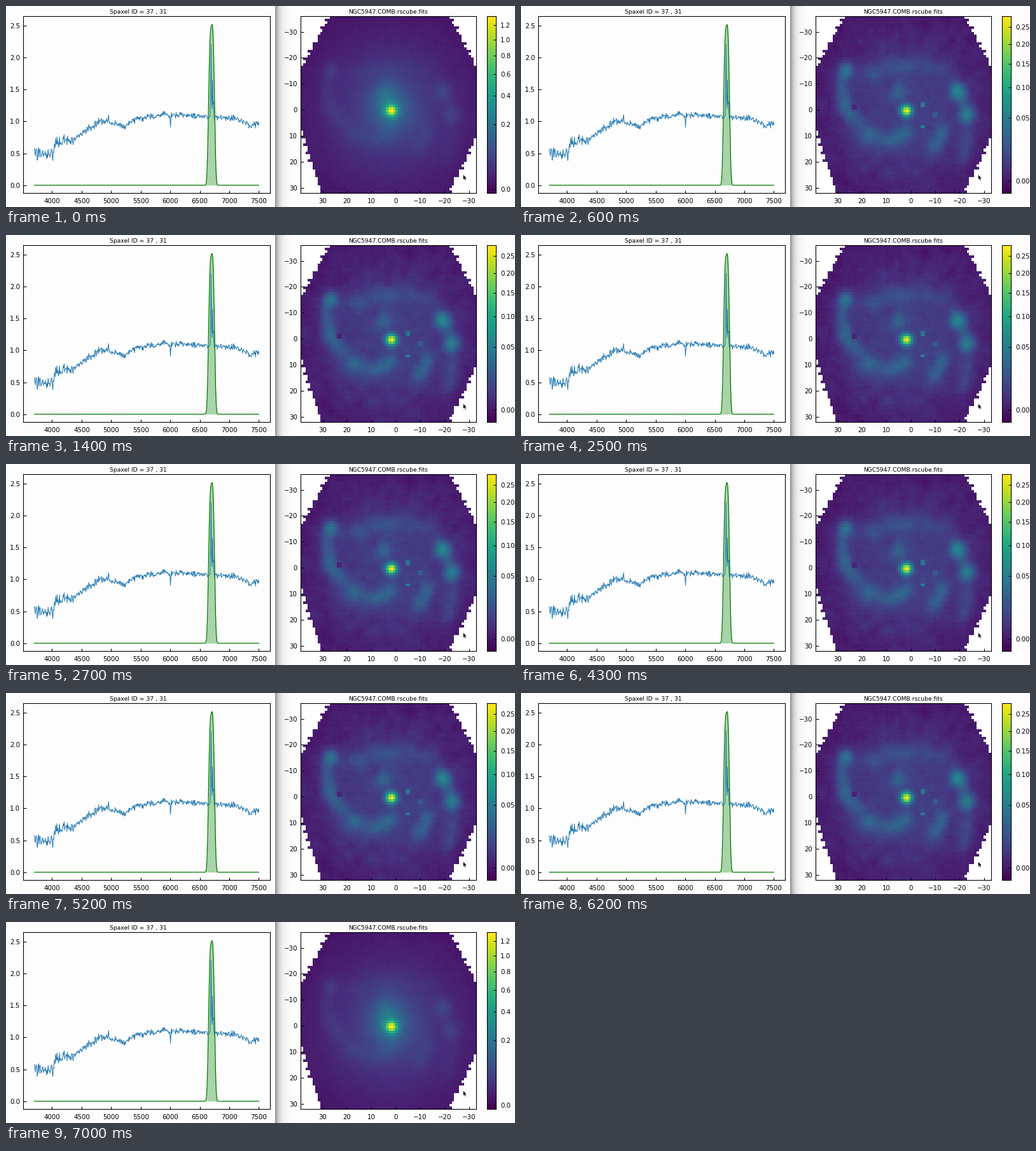
Recreate the animation shown at these times as a matplotlib script. Size 800 by 316 pixels, loop 7.1 s.

```python
import numpy as np
import matplotlib.pyplot as plt
from matplotlib.animation import FuncAnimation
from matplotlib.patches import Polygon

W, H, DPI = 800, 316, 100
STEP, FRAMES = 100, 71
SWITCHES = (400, 2800, 4200, 6300)  # ms
BG = "#fdfdfd"
PX = 72 / DPI  # points per pixel

plt.rcParams.update({"font.family": "DejaVu Sans", "font.size": 10.2 * PX,
                     "axes.linewidth": 1.1 * PX})
for k in ("xtick", "ytick"):
    plt.rcParams.update({f"{k}.direction": "in", f"{k}.major.size": 4.5 * PX,
                         f"{k}.major.width": 1.1 * PX})
plt.rcParams.update({"xtick.major.pad": 7.6 * PX, "ytick.major.pad": 4.8 * PX})

rng = np.random.default_rng(37)
fig = plt.figure(figsize=(W / DPI, H / DPI), dpi=DPI, facecolor=BG)


def axes(x0, y0, x1, y1, **kw):
    """Axes from pixel corners, y measured from the top."""
    return fig.add_axes([x0 / W, 1 - y1 / H, (x1 - x0) / W, (y1 - y0) / H], **kw)


def layer(z):
    ax = axes(0, 0, W, H, zorder=z)
    ax.axis("off")
    return ax


def title(x, text, size):
    fig.text(x / W, 1 - 11.7 / H, text, ha="center", va="baseline",
             fontsize=size * PX)


# Shadow at the window edge
back = layer(-1)
shade = .99 - .42 * np.exp(-np.arange(24) / 6)
back.imshow(shade[None], extent=(423, 447, H, 0), cmap="gray", vmin=0, vmax=1,
            aspect="auto", interpolation="nearest")
back.set(xlim=(0, W), ylim=(H, 0))


# Spectrum
def spectrum(lam):
    flux = np.interp(lam,
                     [3700, 3950, 4080, 4380, 4800, 5250, 5350, 5900, 7130, 7350, 7500],
                     [.53, .47, .67, .73, 1.0, .93, 1.02, 1.11, 1.05, .93, .97])
    flux += rng.normal(0, 1, lam.size) * np.interp(lam, [3700, 5500], [.05, .023])
    for mid, amp in [(4012, -.17), (4956, .13), (6004, -.17),
                     (6692, 1.17), (6716, .6), (6732, .25)]:
        flux += amp * np.exp(-((lam - mid) / 7) ** 2)
    return flux


left = axes(27, 16, 415, 294, facecolor=BG)
lam = np.arange(3700, 7501, 8.0)
left.plot(lam, spectrum(lam), color="#1f77b4", lw=1.0 * PX, zorder=2)

band = np.arange(3700, 7501, 2.0)
off = (band - 6699) / 58
curve = 2.5 * np.exp(-np.abs(off) ** 3.2) * (1 + .05 * np.tanh(off))
left.fill_between(band, curve, color="green", alpha=.33, lw=0, zorder=1)
left.plot(band, curve, color="#007a00", lw=1.25 * PX, zorder=3)
left.set(xlim=(3510, 7690), ylim=(-.122, 2.645),
         xticks=range(4000, 7501, 500), yticks=np.arange(0, 2.6, .5))
title(208, "Spaxel ID = 37 , 31", 9.26)

# Galaxy maps on a 72 x 68 grid, worked out in stage pixels
COLS, ROWS = 72, 68
X0, Y0, X1, Y1 = 463, 16, 739, 294
CELL = (X1 - X0) / COLS
xs = X0 + (np.arange(COLS) + .5) * CELL
ys = Y0 + (np.arange(ROWS) + .5) * (Y1 - Y0) / ROWS
gx, gy = np.meshgrid(xs, ys)


def bell(x, y, sx, sy=None):
    return np.exp(-((gx - x) / sx) ** 2 - ((gy - y) / (sy or sx)) ** 2)


def blur(a, n):
    k = np.ones(n) / n
    for axis in (0, 1):
        a = np.apply_along_axis(np.convolve, axis, a, k, mode="same")
    return a


def arm(a, b, c, width, strength):
    """Clumpy band along a quadratic curve."""
    a, b, c = map(np.array, (a, b, c))
    total = 0
    for t in np.linspace(0, 1, 9):
        x, y = (1 - t) ** 2 * a + 2 * t * (1 - t) * b + t * t * c
        total = total + rng.uniform(.6, 1) * bell(x, y, width)
    return strength * total / total.max()


arms = (arm((508, 104), (492, 165), (548, 198), 12, .18)
        + arm((535, 206), (595, 222), (608, 192), 13, .16)
        + arm((642, 226), (664, 215), (662, 186), 13, .14)
        + arm((545, 106), (600, 85), (662, 100), 15, .09)
        + arm((684, 125), (716, 170), (692, 242), 13, .13))
knots = sum(k * bell(x, y, 12, 13) for x, y, k in
            [(511, 100, .2), (686, 135, .2), (700, 171, .2), (593, 136, .15)])
detail = arms + knots
r = np.hypot(gx - 606, gy - 165)
grain = rng.normal(0, 1, (ROWS, COLS))
clumps = blur(rng.normal(0, 1, (ROWS, COLS)), 4)

wide = (.045 + .15 * np.exp(-(r / 110) ** 2) + .1 * np.exp(-(r / 38) ** 2)
        + .2 * np.exp(-(r / 14) ** 2) + .47 * np.exp(-(r / 8) ** 2)
        + .11 * bell(599, 146, 24, 32) + .27 * detail
        + .004 * grain + .008 * clumps)
narrow = (.065 + .12 * np.exp(-(r / 115) ** 3) + .8 * np.exp(-(r / 9) ** 2)
          + detail + .005 * grain + .045 * clumps)
for x, y, v in [(524, 160, .1), (632, 156, .38), (632, 190, .42), (651, 172, .28)]:
    narrow[(abs(gx - x) < CELL) & (abs(gy - y) < CELL)] = v

# Ragged hexagonal field of view
tooth = CELL * (np.arange(ROWS) % 3 == 1)[:, None]
lo = np.maximum(509 - .54 * (gy - 16), 461 + .33 * (gy - 185)) - tooth
hi = np.minimum(697 + .52 * (gy - 16), 741 - .5 * (gy - 202)) + tooth
outside = (gx < lo) | (gx > hi)
MAPS = [np.ma.array(np.clip(m, 0, 1), mask=outside) for m in (wide, narrow)]

right = axes(X0, Y0, X1, Y1, facecolor="white")
sky = right.imshow(MAPS[0], cmap="viridis", vmin=0, vmax=1, aspect="auto",
                   interpolation="nearest", extent=(39, -33, 32, -36))
right.set(xticks=range(30, -31, -10), yticks=range(-30, 31, 10))
title(600.5, "NGC5947.COMB.rscube.fits", 9.08)

# Colour bar with a square-root scale
bar = axes(756, Y0, 770, Y1)
bar.imshow(np.linspace(0, 1, 256)[:, None], cmap="viridis", aspect="auto",
           origin="lower", extent=(0, 1, 0, 1))
bar.set_xticks([])
bar.yaxis.tick_right()
bar.tick_params(axis="y", pad=7 * PX)


def scale(vmin, span, ticks, fmt):
    return [((t - vmin) / span) ** .5 for t in ticks], [fmt % t for t in ticks]


SCALES = [scale(-.0006, 1.329, np.arange(7) * .2, "%.1f"),
          scale(-.0013, .285, np.arange(6) * .05, "%.2f")]

# Mouse pointer
front = layer(9)
front.set(xlim=(0, W), ylim=(H, 0))
tip = np.array([(0, 0), (0, 8.2), (1.8, 6.6), (3.1, 9.4), (4.5, 8.8),
                (3.3, 6.1), (5.6, 5.9)])
front.add_patch(Polygon(tip + (718.6, 265), fc="black", ec="white", lw=.5 * PX))


def draw(i):
    which = sum(i * STEP >= t for t in SWITCHES) % 2
    sky.set_data(MAPS[which])
    bar.set_yticks(*SCALES[which])
    return ()


anim = FuncAnimation(fig, draw, frames=FRAMES, interval=STEP, repeat=True,
                     repeat_delay=0, blit=False)
plt.show()
```
